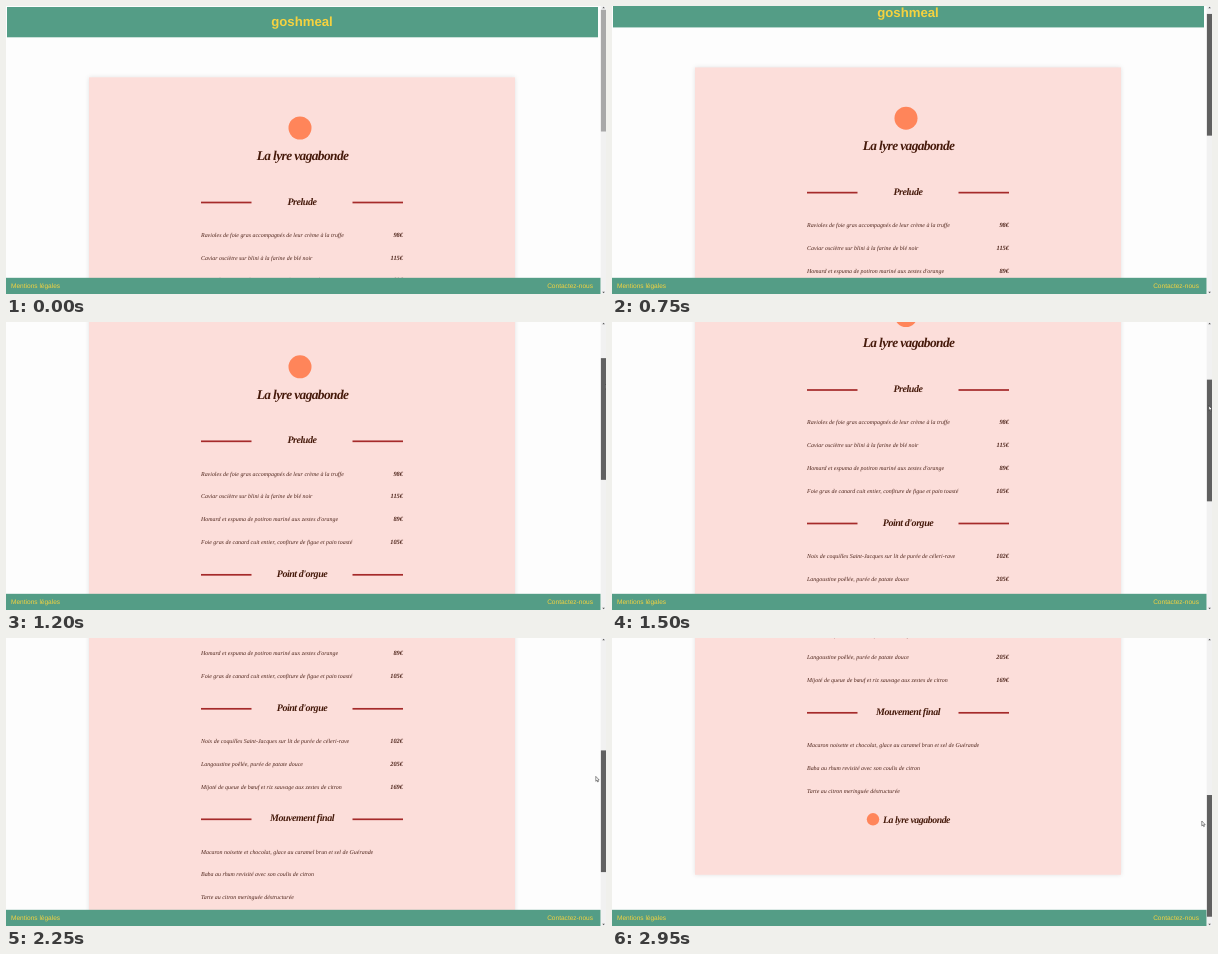
Animation of 600 by 288 pixels, one loop 3000 ms. Source, as an HTML page:

```html
<!DOCTYPE html>
<html lang="fr">
<head>
<meta charset="utf-8">
<title>Menu</title>
<style>
  html, body { margin: 0; width: 100%; height: 100%; overflow: hidden; background: #fdfdfd; }
  svg { display: block; width: 100vw; height: 100vh; text-rendering: geometricPrecision; }
  .sans { font-family: "Liberation Sans", Arial, sans-serif; fill: #f5d23f; }
  .brand { font-size: 13.2px; font-weight: bold; text-anchor: middle; }
  .link { font-size: 6.55px; }
  .menu { font-family: "Liberation Serif", "Times New Roman", serif; font-style: italic; fill: #4c2319; }
  .dish { font-size: 5.95px; }
  .price { font-size: 6.4px; font-weight: bold; text-anchor: end; }
  .heading { font-weight: bold; letter-spacing: -.045em; text-anchor: middle; fill: #461a0b; }
  .end { text-anchor: end; }
  .card { fill: #fcdeda; filter: drop-shadow(0 0 2px rgba(0, 0, 0, .11)); }
</style>
</head>
<body>
<svg viewBox="0 0 600 288">
  <rect width="600" height="288" fill="#fdfdfd"/>
  <g id="page">
    <rect x="1" y="1" width="591" height="30.3" fill="#549d86"/>
    <text class="sans brand" x="296" y="20.4">goshmeal</text>
    <rect class="card" x="83" y="71.3" width="426" height="531.2"/>
    <circle cx="294" cy="122" r="11.5" fill="#ff855a"/>
    <circle cx="261" cy="547" r="6.2" fill="#ff855a"/>
    <g id="menu" class="menu"></g>
  </g>
  <rect y="271.8" width="594.7" height="16.2" fill="#549d86"/>
  <text class="sans link" x="5" y="281.6">Mentions légales</text>
  <text class="sans link end" x="587" y="281.6">Contactez-nous</text>
  <rect x="594.7" width="5.3" height="288" fill="#f1f1f1"/>
  <path d="M596.3 2.3l1.3-1.5 1.3 1.5zM596.3 285.7l1.3 1.5 1.3-1.5z" fill="#555"/>
  <rect id="thumb" x="594.9" width="5.1" height="121.7"/>
  <path id="cursor" d="M0 0V4.9L1.1 3.9 1.9 5.6 2.6 5.3 1.9 3.6H3.4Z" fill="#fff" stroke="#222" stroke-width=".5"/>
</svg>
<script>
const LOOP = 3000, STEP = 50, DRAG_START = 600;
const DISH_GAP = 22.8, RULE_HEIGHT = 1.7;

const sections = [
  { y: 196.5, title: "Prelude", dishes: [
    ["Ravioles de foie gras accompagnés de leur crème à la truffe", 98],
    ["Caviar osciètre sur blini à la farine de blé noir", 115],
    ["Homard et espuma de potiron mariné aux zestes d'orange", 89],
    ["Foie gras de canard cuit entier, confiture de figue et pain toasté", 105]] },
  { y: 330, title: "Point d'orgue", dishes: [
    ["Noix de coquilles Saint-Jacques sur lit de purée de céleri-rave", 102],
    ["Langoustine poêlée, purée de patate douce", 205],
    ["Mijoté de queue de bœuf et riz sauvage aux zestes de citron", 169]] },
  { y: 440.5, title: "Mouvement final", dishes: [
    ["Macaron noisette et chocolat, glace au caramel brun et sel de Guérande"],
    ["Baba au rhum revisité avec son coulis de citron"],
    ["Tarte au citron meringuée déstructurée"]] }
];

// [time in ms, value]
const scrollKeys = [[600, 0], [950, 38.4], [1500, 128.5], [1850, 194.5], [2250, 259.2], [2950, 365.7]];
const cursorKeys = [[950, 602], [1500, 596.8], [1850, 589.8], [2950, 589.8]];

const byId = id => document.getElementById(id);
const menu = byId("menu"), page = byId("page"), thumb = byId("thumb"), cursor = byId("cursor");

function add(tag, attrs, text = "") {
  const node = document.createElementNS("http://www.w3.org/2000/svg", tag);
  for (const key in attrs) node.setAttribute(key, attrs[key]);
  node.textContent = text;
  menu.append(node);
}

function heading(text, x, y, size) {
  add("text", { class: "heading", x, y, "font-size": size }, text);
}

function buildMenu() {
  heading("La lyre vagabonde", 296.5, 153.8, 13.4);
  for (const { y, title, dishes } of sections) {
    for (const x of [195, 346.5]) {
      add("rect", { x, y: y - RULE_HEIGHT / 2, width: 50.5, height: RULE_HEIGHT, fill: "#a52a2a" });
    }
    heading(title, 296, y + 2, 10);
    dishes.forEach(([name, price], i) => {
      const baseline = y + 34.3 + i * DISH_GAP;
      add("text", { class: "dish", x: 195, y: baseline }, name);
      if (price) add("text", { class: "price", x: 397, y: baseline }, price + "€");
    });
  }
  heading("La lyre vagabonde", 304.5, 550.6, 9.8);
}

// Smooth curve through the keys, held flat before the first and after the last
function curve(keys, t) {
  const last = keys.length - 1;
  if (t <= keys[0][0]) return keys[0][1];
  if (t >= keys[last][0]) return keys[last][1];
  const i = keys.findIndex(key => key[0] > t) - 1;
  const slope = k => {
    if (k === 0) return 0;
    const a = keys[k - 1], b = keys[Math.min(k + 1, last)];
    return (b[1] - a[1]) / (b[0] - a[0]);
  };
  const [t0, v0] = keys[i], [t1, v1] = keys[i + 1];
  const d = t1 - t0, u = (t - t0) / d, w = 1 - u;
  return w * w * ((1 + 2 * u) * v0 + u * d * slope(i))
       + u * u * ((3 - 2 * u) * v1 - w * d * slope(i + 1));
}

function linear(keys, t) {
  const i = keys.findIndex(key => key[0] > t);
  if (i === 0) return keys[0][1];
  if (i < 0) return keys[keys.length - 1][1];
  const [t0, v0] = keys[i - 1], [t1, v1] = keys[i];
  return v0 + (v1 - v0) * (t - t0) / (t1 - t0);
}

function render(now) {
  const t = Math.floor(now % LOOP / STEP) * STEP;
  const scroll = curve(scrollKeys, t);
  const top = 3.8 + scroll * 0.419;
  page.setAttribute("transform", `translate(0 ${-scroll})`);
  thumb.setAttribute("y", top);
  thumb.setAttribute("fill", t < DRAG_START ? "#a8a8a8" : "#606060");
  cursor.setAttribute("transform", `translate(${linear(cursorKeys, t)} ${top + 26})`);
}

buildMenu();
const start = performance.now();
function tick() {
  render(performance.now() - start);
  requestAnimationFrame(tick);
}
tick();
</script>
</body>
</html>
```
